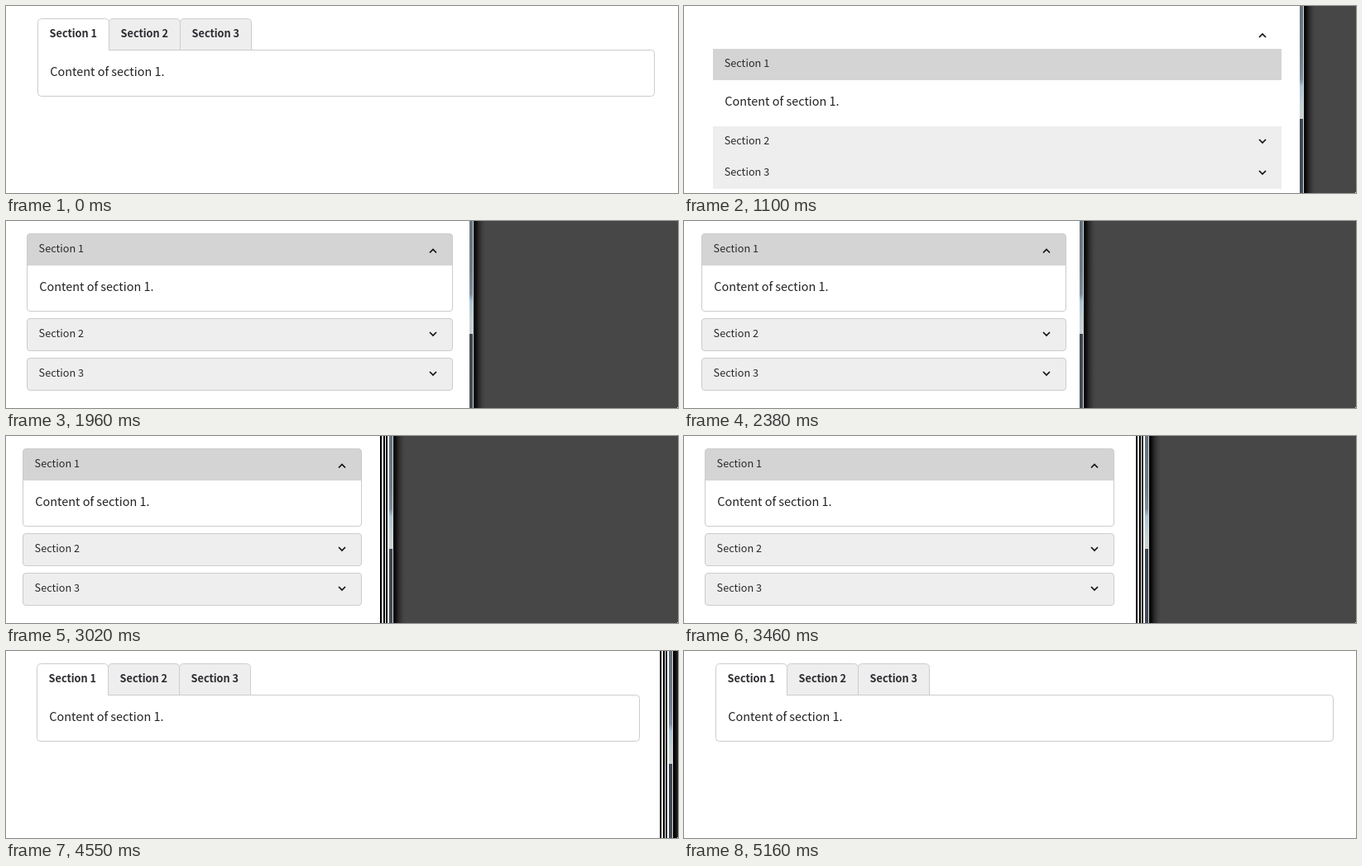
Recreate the animation shown at these times as an HTML page. Size 812 by 227 pixels, loop 5.6 s.

```html
<!DOCTYPE html>
<html lang="en">
<head>
<meta charset="utf-8">
<title>Responsive tabs</title>
<style>
  html, body { margin: 0; width: 100%; height: 100%; overflow: hidden; background: #fff; }
  svg { display: block; width: 812px; height: 227px; }
  text { font: 12.7px "Noto Sans CJK JP", "Noto Sans CJK SC", "Noto Sans CJK", "Open Sans", sans-serif; fill: #2b2b2b; }
  .tab { font-weight: 700; fill: #2a2a30; }
  .body { font-size: 14.45px; fill: #222; }
  .line { fill: none; stroke: #ccc; }
  .chevron { fill: none; stroke: #111; stroke-width: 1.7; }
</style>
</head>
<body>
<svg viewBox="0 0 812 227">
  <defs>
    <linearGradient id="desk" gradientUnits="userSpaceOnUse" x1="0" y1="0" x2="0" y2="227">
      <stop offset="0" stop-color="#66717c"/>
      <stop offset=".27" stop-color="#6f7c8a"/>
      <stop offset=".39" stop-color="#7d8c9c"/>
      <stop offset=".43" stop-color="#a9c4d6"/>
      <stop offset=".53" stop-color="#c3d0d2"/>
      <stop offset=".602" stop-color="#cdd3d2"/>
      <stop offset=".605" stop-color="#3d4650"/>
      <stop offset="1" stop-color="#454c56"/>
    </linearGradient>
    <linearGradient id="shade">
      <stop offset="0" stop-color="#000"/>
      <stop offset=".15" stop-color="#080707"/>
      <stop offset=".45" stop-color="#2b2929"/>
      <stop offset=".75" stop-color="#3f3e3e"/>
      <stop offset="1" stop-color="#464746"/>
    </linearGradient>
  </defs>
  <g id="scene"></g>
</svg>
<script>
const LOOP = 5600;
const TABS = 0, PLAIN = 1, CARDS = 2;

// start ms, panel left, panel right, window edge, layout
const steps = [
  [0, 38, 784, 900, TABS],
  [650, 38, 777, 807, TABS],
  [850, 37, 760, 789, TABS],
  [1100, 35, 722, 749, PLAIN],
  [1320, 32, 656, 681, CARDS],
  [1540, 30, 615, 642, CARDS],
  [1760, 27, 581, 608, CARDS],
  [1960, 25, 540, 565, CARDS],
  [2180, 23, 502, 526, CARDS],
  [2380, 21, 462, 483, CARDS],
  [2600, 19, 409, 429, CARDS],
  [2800, 18, 395, 416, CARDS],
  [3020, 20, 430, 468, CARDS],
  [3240, 22, 466, 505, CARDS],
  [3460, 25, 520, 562, CARDS],
  [3680, 27, 567, 613, CARDS],
  [3880, 29, 613, 662, CARDS],
  [4100, 33, 684, 730, CARDS],
  [4320, 35, 728, 774, CARDS],
  [4550, 37, 766, 806, TABS],
  [4770, 38, 784, 900, TABS],
  [5160, 38, 785, 900, TABS]
];

const rect = (x, y, w, h, fill) =>
  `<rect x="${x}" y="${y}" width="${w}" height="${h}" fill="${fill}"/>`;
const box = (x, y, w, h, fill) =>
  `<rect x="${x + .5}" y="${y + .5}" width="${w - 1}" height="${h - 1}" rx="3.5" fill="${fill}" stroke="#ccc"/>`;
const label = (x, y, str, cls = '') => `<text x="${x}" y="${y}" class="${cls}">${str}</text>`;
const chevron = (x, y, dir) =>
  `<path class="chevron" d="M${x - 4} ${y - 2 * dir}L${x} ${y + 2 * dir}L${x + 4} ${y - 2 * dir}"/>`;

function tab(left, i) {
  const x = left + 86 * i + .5;
  const shape = `M${x} 54V20.5q0-5 5-5h76q5 0 5 5V54`;
  return `<path d="${shape}" fill="${i ? '#eee' : '#fff'}" stroke="#ccc"/>` +
    label(left + 14.6 + 86 * i, 38, `Section ${i + 1}`, 'tab');
}

function tabs(l, r) {
  const panel = `<path class="line" d="M${l + .5} 53.5H${r - 4.5}q4 0 4 4V105.5q0 4-4 4H${l + 4.5}q-4 0-4-4Z"/>`;
  return tab(l, 2) + tab(l, 1) + panel + tab(l, 0) +
    label(l + 15.2, 85, 'Content of section 1.', 'body');
}

// Unstyled moment while the layout switches
function plain(l, r) {
  const w = r - l, x = l + 13.7;
  return rect(l, 52, w, 38, '#d4d4d4') + rect(l, 146, w, 76, '#eee') +
    label(x, 74, 'Section 1') + label(l + 14.3, 121, 'Content of section 1.', 'body') +
    label(x, 168, 'Section 2') + label(x, 206, 'Section 3') +
    chevron(r - 23, 36, -1) + chevron(r - 23, 164, 1) + chevron(r - 23, 202, 1);
}

function cards(l, r) {
  const w = r - l, x = l + 14.6;
  const head = `<path d="M${l + .5} 54V19.5q0-4 4-4H${r - 4.5}q4 0 4 4V54Z" fill="#d4d4d4"/>`;
  return head + box(l, 15, w, 95, 'none') +
    box(l, 118, w, 40, '#eee') + box(l, 166, w, 40, '#eee') +
    label(x, 38, 'Section 1') + label(l + 15.2, 85, 'Content of section 1.', 'body') +
    label(x, 141, 'Section 2') + label(x, 189, 'Section 3') +
    chevron(r - 24, 36.5, -1) + chevron(r - 24, 137, 1) + chevron(r - 24, 185, 1);
}

function desktop(edge, growing) {
  if (edge > 812) return '';
  const bars = growing ? [16, 12, 9].map(d => rect(edge - d, 0, 2, 227, '#000')).join('') : '';
  return bars + rect(edge - 5, 0, 4, 227, 'url(#desk)') + rect(edge - 1, 0, 1, 227, '#d5dadb') +
    rect(edge, 0, 812, 227, '#464746') + rect(edge, 0, 14, 227, 'url(#shade)') +
    rect(811, 226, 1, 1, '#ddd');
}

const layouts = [tabs, plain, cards];
const scene = document.getElementById('scene');
let shown = -1;

function draw() {
  const t = performance.now() % LOOP;
  const i = steps.findLastIndex(s => s[0] <= t);
  if (i !== shown) {
    const [start, left, right, edge, layout] = steps[shown = i];
    scene.innerHTML = layouts[layout](left, right) + desktop(edge, start > 2900);
  }
  requestAnimationFrame(draw);
}
draw();
</script>
</body>
</html>
```
